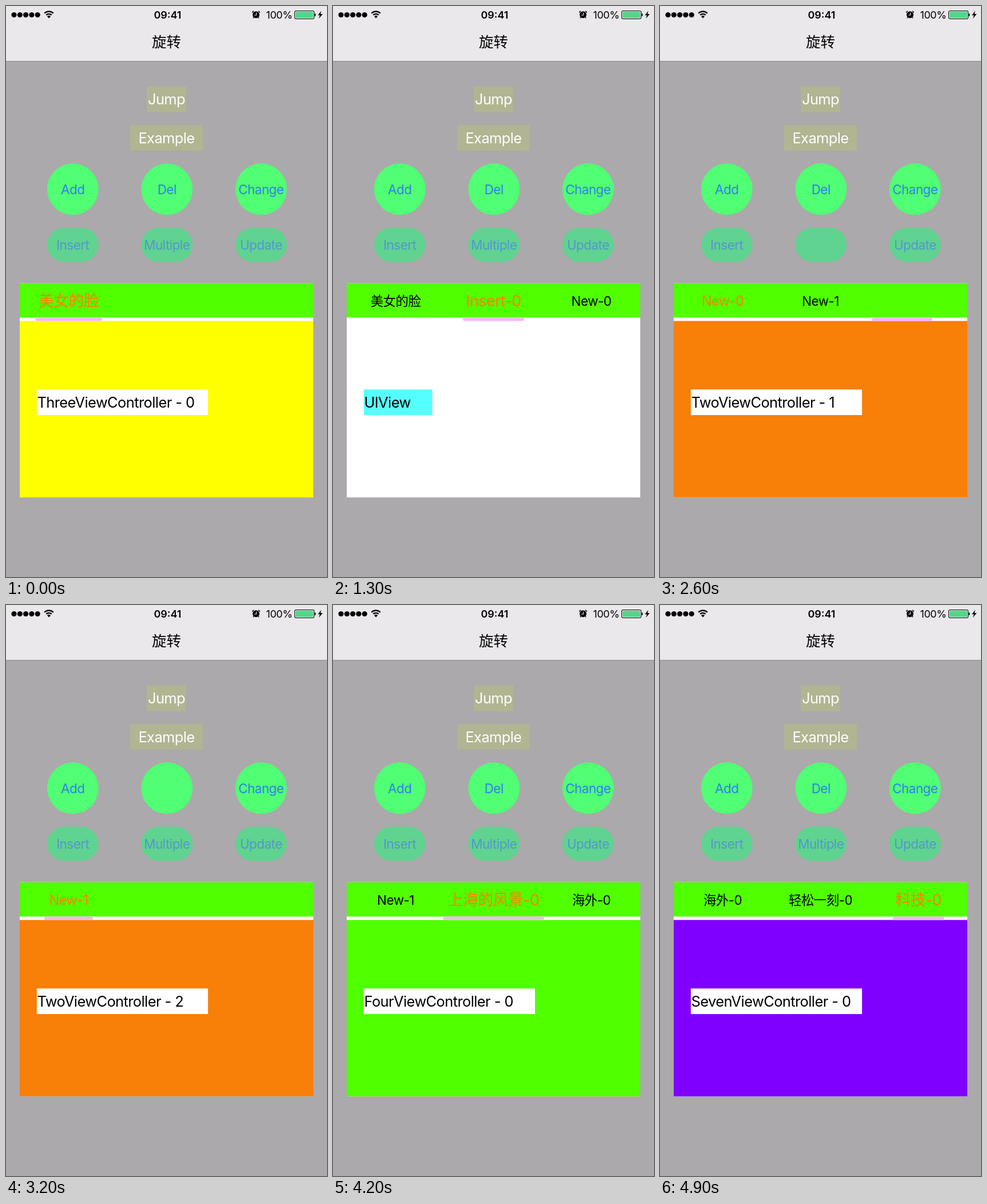
Write an HTML page with a canvas that moves like this. It is 561 px wide and 998 px high and loops after 5000 ms.

```html
<!DOCTYPE html>
<html lang="zh-CN">
<head>
<meta charset="utf-8">
<style>
html, body { margin: 0; width: 100%; height: 100%; overflow: hidden; background: #aba9ab; }
canvas { display: block; }
</style>
</head>
<body>
<canvas id="stage" width="561" height="998"></canvas>
<script>
const ctx = document.getElementById('stage').getContext('2d');
const LOOP = 5000, STEP = 100, TWEEN = 243, LEAD = 43;
const GREEN = '#50ff00', ORANGE = '#ff8000';
const FONT = 'Inter, "Noto Sans CJK SC", "Noto Sans CJK", sans-serif';
const pt = 561 / 375; // the layout is laid out in points on a 375 wide screen

// Underline width for each tab that can be selected
const UNDERLINE = { '美女的脸': 117, 'Insert-0': 107, 'New-0': 85, 'New-1': 86, '上海的风景-0': 177, '科技-0': 90 };

const page = (label, color, labelColor = '#fff', width = 200) => ({ label, color, labelColor, width });
const three = page('ThreeViewController - 0', '#ffff00');
const plain = page('UIView', '#fff', '#55ffff', 80);
const two = n => page('TwoViewController - ' + n, '#f87f08');
const four = page('FourViewController - 0', GREEN);
const seven = page('SevenViewController - 0', '#8000ff');
const trip = ['New-1', '上海的风景-0', '海外-0', '轻松一刻-0', '科技-0'];

const state = (start, press, tabs, sel, view, scroll = 0) => ({ start, press, tabs, sel, view, scroll });
const states = [
  state(0, '', ['美女的脸'], 0, three),
  state(200, 'Add', ['美女的脸', 'New-0'], 0, three),
  state(400, 'Insert', ['美女的脸', 'Insert-0', 'New-0'], 1, plain),
  state(900, 'Add', ['美女的脸', 'Insert-0', 'New-0', 'New-1'], 1, plain),
  state(1800, 'Change', ['美女的脸', 'New-0', 'Insert-0', 'New-1'], 2, plain),
  state(2600, 'Multiple', ['New-0', 'New-1'], 0, two(1)),
  state(3200, 'Del', ['New-1'], 0, two(2)),
  state(4000, 'Multiple', trip, 1, four),
  state(4400, '', trip, 4, seven, 2),
];

const mix = (a, b, p) => a + (b - a) * p;

function rect(x, y, w, h, color, radius = 0) {
  ctx.fillStyle = color;
  ctx.beginPath();
  ctx.roundRect(x, y, w, h, radius);
  ctx.fill();
}

const rectPt = (x, y, w, h, color, radius = 0) =>
  rect(x * pt, y * pt, w * pt, h * pt, color, radius * pt);

function text(str, x, cy, size, color, align = 'center', weight = 400) {
  ctx.font = `${weight} ${size}px ${FONT}`;
  ctx.letterSpacing = (weight > 400 ? 0 : -0.022 * size) + 'px';
  ctx.textAlign = align;
  ctx.fillStyle = color;
  ctx.fillText(str, x, cy + size * 0.36);
}

function shape(color, points) {
  ctx.fillStyle = color;
  ctx.beginPath();
  points.forEach(p => ctx.lineTo(...p));
  ctx.fill();
}

function line(width, color, points) {
  ctx.lineWidth = width;
  ctx.strokeStyle = color;
  ctx.beginPath();
  points.forEach(p => ctx.lineTo(...p));
  ctx.stroke();
}

function disc(x, y, r, color) {
  rect(x - r, y - r, 2 * r, 2 * r, color, r);
}

function drawStatusBar() {
  rect(0, 0, 561, 96, '#ebe8eb');
  rect(0, 96, 561, 1, '#8c8a8c');
  for (let i = 0; i < 5; i++) disc(14 + i * 10.3, 15.5, 4.6, '#000');

  ctx.strokeStyle = '#000';
  ctx.lineWidth = 2.3;
  for (const r of [6.7, 11]) {
    ctx.beginPath();
    ctx.arc(75, 20.5, r, -Math.PI * 0.75, -Math.PI * 0.25);
    ctx.stroke();
  }
  shape('#000', [[75, 21.5], [71.8, 18], [75, 16.6], [78.2, 18]]);

  text('09:41', 282.5, 15.5, 17.9, '#000', 'center', 600);

  disc(437, 15.3, 6, '#000');
  for (const side of [-1, 1]) {
    line(1.6, '#000', [[437 + side * 6.8, 11.5], [437 + side * 4.2, 8.8]]);
    line(1.4, '#000', [[437 + side * 4, 19.5], [437 + side * 5, 21.3]]);
  }
  line(1.2, '#ebe8eb', [[437.5, 11.5], [437.5, 16], [434, 16]]);

  text('100%', 454.5, 15.5, 17.9, '#000', 'left');
  rect(504, 8, 35, 15, '#000', 3);
  rect(505, 9, 33, 13, '#ebe8eb', 2);
  rect(506, 10, 31, 11, '#52d689', 1.5);
  rect(539.5, 13, 1.8, 5, '#000', 1);
  shape('#000', [[551, 8.5], [545, 16.2], [548.6, 16.2], [546.8, 22], [553.5, 14], [549.6, 14]]);

  text('旋转', 280.5, 63, 25.4, '#000', 'center', 500);
}

function drawButtons(pressed) {
  rectPt(164.4, 94, 46.2, 30, '#b1b592');
  text('Jump', 280.5, 163, 25.4, '#fff');
  rectPt(145, 139, 85, 30, '#b1b592');
  text('Example', 280.5, 230.5, 25.4, '#fff');

  const row = (names, y, h, fill, color) => names.forEach((name, i) => {
    const x = 78 + i * 110;
    rectPt(x - 30, y - h / 2, 60, h, fill, Math.min(30, h / 2));
    if (name !== pressed) text(name, x * pt, y * pt + 0.7, 22.4, color);
  });
  row(['Add', 'Del', 'Change'], 214, 60, '#50ff73', '#2d7ff0');
  row(['Insert', 'Multiple', 'Update'], 279, 40, '#5fd38f', '#5595cf');
}

function drawPager(now, prev, p) {
  const ease = p * p * (3 - 2 * p);
  const scroll = mix(prev.scroll, now.scroll, ease);
  const center = slot => 109.5 + slot * 171;
  const name = now.tabs[now.sel], oldName = prev.tabs[prev.sel];
  const { view } = now;

  ctx.save();
  ctx.beginPath();
  ctx.rect(24, 484, 513, 376);
  ctx.clip();

  rectPt(16, 324, 343, 250, '#fff');
  rectPt(16, 324, 343, 40, GREEN);
  rectPt(16, 368, 343, 206, view.color);

  now.tabs.forEach((tab, i) => {
    const active = i === now.sel;
    const grow = name === oldName ? 1 : Math.min(1, p * 1.5);
    text(tab, center(i - scroll), 515.5, 22.4 * (active ? 1 + 0.2 * grow : 1), active ? ORANGE : '#000');
  });

  const width = mix(UNDERLINE[oldName], UNDERLINE[name], ease);
  const x = center(mix(prev.sel - prev.scroll, now.sel - now.scroll, ease));
  rect(x - width / 2, 364 * pt, width, 4 * pt, '#f8b5f5', 3);

  rectPt(36, 448, view.width, 30, view.labelColor);
  text(view.label, 54.5, 693, 25.4, '#000', 'left');
  ctx.restore();
}

function draw() {
  const t = Math.floor(performance.now() % LOOP / STEP) * STEP;
  const index = states.findLastIndex(s => s.start <= t);
  const now = states[index];
  const prev = states[Math.max(0, index - 1)];
  const age = t - now.start;

  rect(0, 0, 561, 998, '#aba9ab');
  drawStatusBar();
  drawButtons(age < STEP ? now.press : '');
  drawPager(now, prev, Math.min(1, (age + LEAD) / TWEEN));
  requestAnimationFrame(draw);
}
requestAnimationFrame(draw);
</script>
</body>
</html>
```
